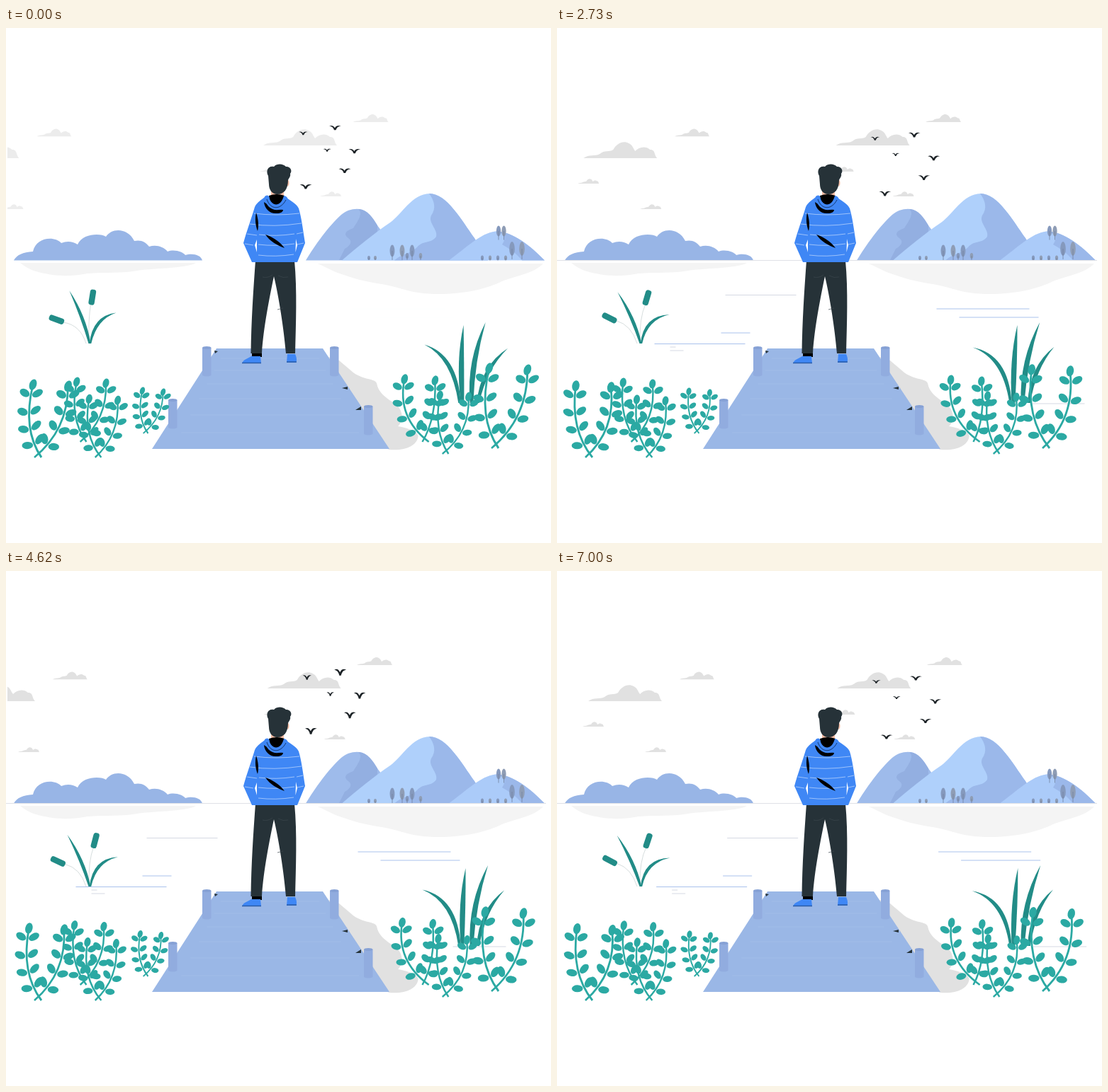
Animation of 769 by 728 pixels, one loop 7.07 s. Source, as an HTML page with a canvas:

```html
<!DOCTYPE html>
<html lang="en">
<head>
<meta charset="utf-8">
<title>Lakeside</title>
<style>
html, body { margin: 0; width: 100%; height: 100%; overflow: hidden; background: #fff; }
canvas { display: block; }
</style>
</head>
<body>
<canvas id="stage" width="769" height="728"></canvas>
<script>
const ctx = document.getElementById('stage').getContext('2d');
const LOOP = 7070, STEP = 70, CYCLE = 4120, LEAD = 100;
const TEAL = '#2ba9a3', REED = '#228c87', DARK = '#263238', BLUE = '#3f87f5';

const clamp = v => Math.max(0, Math.min(1, v));
const mix = (a, b, k) => a + (b - a) * k;
const bend = (a, b, c, k) => mix(mix(a, b, k), mix(b, c, k), k);
const fade = (p, from) => clamp((p - from) / 180) * clamp((CYCLE - p) / 150);

function fill(color, path) {
  ctx.fillStyle = color;
  ctx.fill(typeof path === 'string' ? new Path2D(path) : path);
}
function stroke(color, width, path) {
  ctx.strokeStyle = color;
  ctx.lineWidth = width;
  ctx.stroke(new Path2D(path));
}
function ellipse(color, x, y, rx, ry, turn = 0) {
  ctx.fillStyle = color;
  ctx.beginPath();
  ctx.ellipse(x, y, rx, ry, turn, 0, Math.PI * 2);
  ctx.fill();
}
function placed(x, y, scaleX, scaleY, draw, turn = 0) {
  ctx.save();
  ctx.translate(x, y);
  ctx.rotate(turn);
  ctx.scale(scaleX, scaleY);
  draw();
  ctx.restore();
}

// --- sky ---
const cloudShape = new Path2D('M0 24C8 18 16 22 23 18C30 12 36 16 42 12C46 4 56-2 64 3C69 5 70 10 73 14C78 8 88 6 94 12C102 12 99 19 104 24Z');
const cloud = (x, y, size) => placed(x, y, size, size, () => fill('#e1e1e1', cloudShape));

function drawClouds(p) {
  const near = .045 * p, far = .0112 * p;
  ctx.save();
  ctx.beginPath();
  ctx.rect(2, 0, 760, 728);
  ctx.clip();
  ctx.globalAlpha = fade(p, -10);
  cloud(near - 90, 160, 1);
  cloud(near + 39, 142, .47);
  cloud(near - 98, 213, .29);
  cloud(near - 10, 249, .29);
  cloud(far + 362, 142, 1);
  cloud(far + 488.5, 121.5, .48);
  cloud(far + 442, 231, .29);
  cloud(far + 357, 196, .29);
  ctx.restore();
}

const birdShape = new Path2D('M-8-2C-5-4-2-3 0 1C2-3 5-4 9-2C5-2 3 0 1.5 5L-1 5C-2 0-5-2-8-2Z');
function drawBirds(p) {
  const flap = .95 - .2 * Math.cos(p * Math.PI / 500);
  const bird = (x, y, size) => placed(x + .0146 * size * p, y + .0036 * size * p,
    size, size * flap, () => fill('#1d2327', birdShape));
  for (let i = 0; i < 4; i++) bird(462.5 + 48 * i - 20.6 * i * i, 140 + 35.5 * i - 2.6 * i * i, 1);
  for (let i = 0; i < 2; i++) bird(418 + 34 * i, 148 + 24 * i, .74 - .12 * i);
}

// --- landscape ---
function grove(x, y, count, gap, height) {
  for (let i = 0; i < count; i++) {
    const tx = x + i * gap, ry = height / 2;
    ellipse(i % 2 ? '#8f9db5' : '#8599bd', tx, y, 1.2 + height * .13, ry);
    stroke('#71829f', .8, `M${tx} ${y}V${Math.min(328, y + ry + 5)}`);
  }
}

function drawLand() {
  fill('#f4f4f4', 'M20 332H268C255 340 200 340 185 343C165 347 140 345 115 347C90 352 70 350 60 348C40 345 30 340 20 332Z');
  fill('#f4f4f4', 'M440 333H758C745 347 720 350 700 358C680 368 650 376 610 376C570 376 560 367 530 362C500 358 480 350 465 345Z');
  fill('#98b5e6', 'M11 328.5Q17 317 38 316C42 296 68 293 78 304Q90 299 101 306C108 290 134 290 141 295C149 282 172 282 181 301C190 299 197 302 202 309C212 306 222 309 228 316C238 312 250 317 253 321C262 318 275 320 277 328.5Z');

  fill('#9ebbeb', 'M423 328.5C436 307 456 279 473 264C484 254 502 253 510 261C516 267 520 273 524 279L560 328.5Z');
  fill('#93afe1', 'M497 256C505 262 495 275 490 283C478 287 476 292 483 297C490 302 485 308 478 312L470 328H524V279C518 268 510 257 497 256Z');
  fill('#afd0fb', 'M474 328.5C495 310 520 290 542 275C560 262 572 235 598 234C622 234 643 272 661 297L680 328.5Z');
  fill('#9bb8ea', 'M597 234C605 245 607 255 600 265C595 275 610 285 607 295C600 305 588 300 580 310C570 320 560 318 548 328.5H680L661 297C643 272 622 234 597 234Z');
  fill('#abcbf9', 'M625 328.5C650 310 670 290 690 287.5C715 287 740 308 760 328.5Z');
  fill('#9bb8ea', 'M690 287.5C705 290 706 298 700 306C710 312 720 318 728 328.5H760C740 308 715 287 690 287.5Z');
  grove(545, 315, 3, 14, 17);
  grove(695, 287, 2, 7.5, 15);
  grove(714, 312, 2, 14, 20);
  grove(512, 325, 2, 9, 6);
  grove(566, 322, 2, 19, 8);
  grove(672, 325, 4, 11, 7);
}

function drawWater(p) {
  ctx.save();
  ctx.globalAlpha = fade(p, 95);
  stroke('#dfe1e6', 1, 'M0 328.5H762');
  ctx.translate(.0175 * p, 0);
  stroke('#d5d9e3', 1, 'M188 377.5h100M110 451h8M110 456h19M620 531h75');
  stroke('#a9c1ec', 1, 'M486 397h131M518 409h112M182 431h41M88 446.5h128');
  ctx.restore();
}

function drawDock() {
  fill('#e1e1e1', 'M455 465L470 470L490 487C505 498 520 495 523 502C525 515 535 522 550 532C560 540 562 555 553 563C570 566 585 572 581 580C578 590 565 598 541 596L500 580Z');
  fill('#9ab7e6', 'M297 453H447L541 595H206Z');
  for (let i = 0; i < 6; i++) {
    const y = 467 + 16 * i + i * i, out = (y - 453) / 142;
    stroke('#a3bee9', .8, `M${mix(310, 235, out)} ${y}H${mix(435, 510, out)}`);
  }
  const post = (x, y) => {
    fill('#91acdf', `M${x} ${y}h12.5v39q-6 3-12.5 0Z`);
    ellipse('#86a1d5', x + 6.25, y, 6.25, 2);
  };
  post(277, 452);
  post(457, 452);
  post(229, 526);
  post(505, 535);
  fill(DARK, 'M294 456l5 1-4 3ZM474 509l8-2v4ZM493 540l8-5v5Z');
}

function drawMan() {
  fill('#f5bda5', 'M374 226H392V243H374Z');
  ellipse('#f5bda5', 397, 219, 2.5, 4.5);
  fill('#000', 'M347 458H361V465H347Z');
  fill(BLUE, 'M346 464H359L360 474H333C335 468 342 467 346 464ZM397 461H408C410 465 411 470 409 473H396Z');
  stroke('#2a5ca8', 1.4, 'M333 473.5H360M396 472H410');
  fill(DARK, 'M352 329H407C411 370 409 420 408 460H395C392 425 385 380 378 351C372 380 363 425 361 460H345.5C346 415 349 370 352 329Z');
  stroke('#3b474d', .7, 'M362 352q7 2 14-3M384 350q7 4 14 2M383 398l8-2');

  fill(BLUE, 'M366 238C361 243 354 246 351 253C346 270 339 289 335 304L347 331H411L422 304C419 285 417 268 413 255C410 248 401 244 393 238Z');
  fill('#fff', 'M354 299L351 307L354 317ZM409 298L411 307L408.500 317Z');
  stroke('rgba(255,255,255,.55)', .9, 'M350 262q30 4 64 0M344 277q34 5 73-1M340 291l14 2M357 292q24 3 50-1M410 291l9-2M337 305l12 2M356 306q24 3 51-1M411 306l9-2M356 321q24 3 50-1');
  fill('#000', 'M371 237Q382 233 393 237L391 251Q382 256 373 249Z');
  fill('#000', 'M364 246C365 256 373 263 382 262C387 262 391 260 391 257L379 256Z');
  fill(BLUE, 'M365 238Q369 235 371 238C374 253 388 254 392 237Q398 238 398 244C394 263 366 262 365 238Z');
  stroke('#14376f', 1, 'M368 242C373 257 387 258 395 243');
  fill('#000', 'M353 261C356 270 357 279 355 287C352 279 351 270 353 261ZM366 292C375 295 386 301 393 311C382 307 373 302 366 292Z');
  fill(DARK, 'M370 209C366 202 370 194 378 196C383 191 391 192 395 196C400 195 405 201 401 206C402 210 399 212 398 215C398 228 392 235 383 235C375 235 371 228 371 221Z');
}

// --- plants ---
// A curved leaf, widest halfway along its bend.
function blade(x, y, cx, cy, tx, ty, width) {
  const length = Math.hypot(tx - x, ty - y);
  const nx = (y - ty) / length * width, ny = (tx - x) / length * width;
  fill(REED, `M${x - nx * .4} ${y}Q${cx - nx} ${cy - ny} ${tx} ${ty}Q${cx + nx} ${cy + ny} ${x + nx * .4} ${y}Z`);
}
function cattail(x, y, turn) {
  const head = new Path2D();
  head.roundRect(-4.2, -11, 8.4, 22, 3.5);
  placed(x, y, 1, 1, () => fill(REED, head), turn);
}
function drawReeds(q) {
  const headX = mix(121, 129, q), sideX = mix(71, 75, q), sideY = mix(412.5, 409, q);
  stroke('#c5cfcf', .7, `M117 446Q116 410 ${headX - 2} 390M113 446Q105 420 ${sideX + 10} ${sideY + 4}`);
  blade(118, 446, mix(110, 107, q), 409, mix(90, 84, q), mix(371, 374, q), 4);
  blade(119, 446, 125, 409, mix(155, 160, q), mix(402, 406, q), 4);
  cattail(headX, mix(380.5, 381.5, q), mix(.14, .34, q));
  cattail(sideX, sideY, mix(-1.24, -1.06, q));

  blade(640, 530, 633, 464, mix(591, 585, q), mix(447, 453, q), 5);
  blade(644, 530, mix(640, 645, q), 470, mix(645, 651, q), 420, 6);
  blade(657, 530, mix(655, 659, q), 470, mix(676, 683, q), 416, 6);
  blade(666, 530, mix(674, 670, q), 480, mix(709, 699, q), mix(453, 450, q), 5);
}

function stem(x, y, tx, ty, side) {
  const height = y - ty, size = mix(.62, 1, clamp((height - 55) / 50));
  const foot = x - side * 5 * size;
  const cx = tx + side * height * .07, cy = y - height * .36, top = ty + 7 * size;
  stroke(TEAL, 2.8 * size, `M${foot} ${y}Q${cx} ${cy} ${tx} ${top}`);
  ellipse(TEAL, tx, top, 5.2 * size, 7.6 * size, .15);
  for (let k = .2; k < .9; k += .22) {
    const px = bend(foot, cx, tx, k), py = bend(y, cy, top, k);
    const along = Math.atan2(mix(cy - y, top - cy, k), mix(cx - foot, tx - cx, k));
    for (const dir of [-1, 1]) {
      const a = along + dir * 1.05, reach = 10.5 * size;
      ellipse(TEAL, px + Math.cos(a) * reach, py + Math.sin(a) * reach, 7.8 * size, 5 * size, a);
    }
  }
}

// Two stems from one foot; the shear grows with height, so the foot stays put.
function plant(x, y, height, sway, flex, lean = 0) {
  const shear = flex * (.71 - sway);
  ctx.save();
  ctx.transform(1, 0, -shear, 1 + shear * .15, shear * y, -shear * .15 * y);
  stem(x, y, x + lean - height * .18, y - height, -1);
  stem(x, y, x + lean + height * .28, y - height + 2, 1);
  ctx.restore();
}
function drawPlants(sway) {
  plant(45, 607, 108, sway, .18);
  plant(109, 585, 90, sway, .12);
  plant(130, 607, 88, sway, .09, -2);
  plant(197, 573, 64, sway, .17);
  plant(592, 585, 94, sway, .12, -20);
  plant(620, 602, 88, sway, .09, 3);
  plant(690, 594, 118, sway, .17);
}

function draw(time) {
  const p = (time + LEAD) % CYCLE, k = p / CYCLE;
  const reedSwing = 1 - Math.abs(1 - k * 2 % 1 * 2);
  // Reaches its far side a little before half time.
  const sway = Math.sin(Math.PI * k ** .9) ** 1.7;
  ctx.clearRect(0, 0, 769, 728);
  drawClouds(p);
  drawLand();
  drawWater(p);
  drawBirds(p);
  drawDock();
  drawMan();
  drawReeds(reedSwing);
  drawPlants(sway);
}

const start = performance.now();
function tick() {
  const time = (performance.now() - start) % LOOP;
  draw(Math.floor(time / STEP) * STEP);
  requestAnimationFrame(tick);
}
tick();
</script>
</body>
</html>
```
